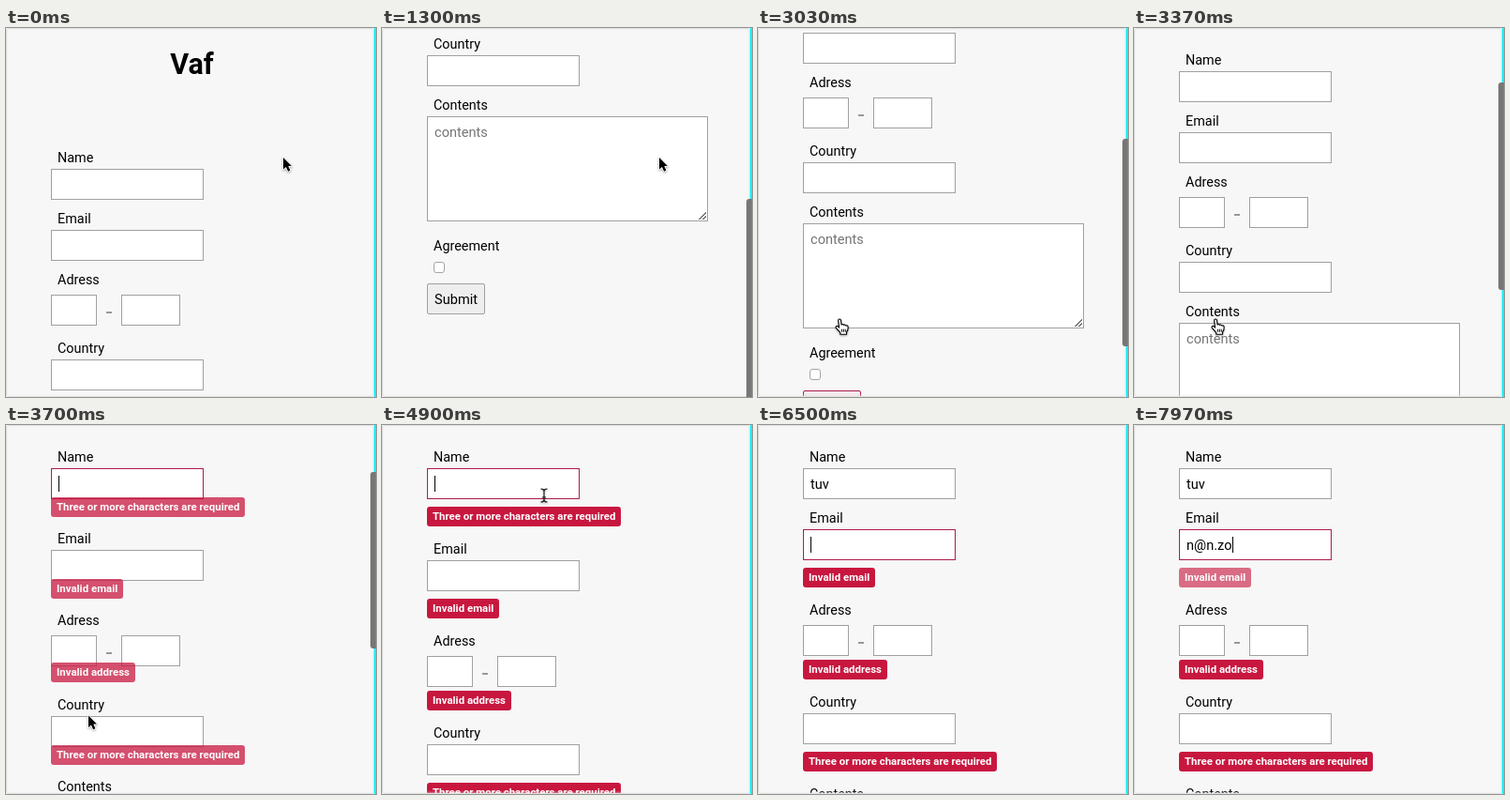
These frames come from a looping animation (395x393 px, 8 s). An HTML page:

```html
<!DOCTYPE html>
<html lang="en">
<head>
<meta charset="utf-8">
<title>Form validation</title>
<style>
html, body { margin: 0; width: 395px; height: 393px; overflow: hidden; }
#stage { position: relative; width: 395px; height: 393px; overflow: hidden; background: #f7f7f7;
  font: 14.4px/18px Roboto, "Liberation Sans", sans-serif; color: #000; cursor: none; }
#stage div, #stage svg { position: absolute; box-sizing: border-box; }
#page { left: 0; top: 0; width: 395px; }
h1 { position: absolute; left: 0; top: 21px; width: 397px; margin: 0; text-align: center; font-size: 30.5px; line-height: 36px; }
.row { left: 48px; top: 0; width: 300px; }
.label { left: 7px; white-space: nowrap; }
.box { height: 33px; border: 1px solid #a0a0a0; background: #fff; font-size: 14.6px; line-height: 32px;
  padding-left: 7px; white-space: pre; }
.caret { display: inline-block; width: 1px; height: 17px; margin-right: -1px; vertical-align: -3px; background: #000; }
.tag { left: 0; height: 21px; padding: 0 6px; border-radius: 3px; background: #c8173f; color: #fff;
  font-size: 11.45px; font-weight: 700; line-height: 20.5px; white-space: nowrap; }
#area { width: 300px; height: 112px; color: #757575; }
#submit { width: 62px; border-radius: 2px; background: #eee; }
#check { left: 7px; width: 12px; height: 12px; border: 1px solid #a5a5a5; border-radius: 3px; background: #fff; }
#frame { inset: 0 2px 0 0; border: 1px solid #e0e0e0; border-radius: 3px; box-shadow: inset 0 0 3px #ececec; }
#edge { right: 0; top: 0; width: 2px; height: 393px; background: #0ff4fb; }
#thumb { left: 389px; width: 6px; border-radius: 3px 0 0 3px; background: linear-gradient(90deg, #777 4.5px, #0bb098 4.5px); }
#cursor { left: 0; top: 0; overflow: visible; filter: drop-shadow(0 1px 1px #0005); }
</style>
</head>
<body>
<div id="stage">
  <div id="page"><h1>Vaf</h1></div>
  <div id="frame"></div>
  <div id="edge"></div>
  <div id="thumb"></div>
  <svg id="cursor" width="20" height="22">
    <g id="arrow" transform="scale(.9)" stroke-linejoin="round">
      <path d="M0 0V14L3.3 11L5.7 16.4L8.2 15.3L5.9 10.1H10Z" stroke="#fff" stroke-width="1.8" paint-order="stroke"/>
    </g>
    <g id="hand" transform="scale(.93)">
      <path d="M3.5 2C3.5 0 6.3 0 6.5 2L7 7Q8.3 5.8 9.4 7.3Q11 6.2 12 8Q14.5 7.4 14.7 9.8Q15 13 13 15.5V18H5.7V16Q3 13 .8 10.6C0 9 1.6 7.8 3 9L4.4 10.3Z"
        fill="#fff" stroke="#000" stroke-width="1.2" stroke-linejoin="round"/>
      <path d="M7.6 12V15.4M9.6 12V15.4M11.6 12V15.4" stroke="#000" fill="none"/>
    </g>
    <g id="beam" fill="none" stroke="#111" stroke-width="1.1">
      <path d="M-3.5 -7Q-.5 -7 0 -5Q.5 -7 3.5 -7M0 -5V5M-3.5 7Q-.5 7 0 5Q.5 7 3.5 7M-2 2H2"/>
    </g>
  </svg>
</div>
<script>
const LOOP = 8000;
const $ = id => document.getElementById(id);
const page = $('page');

const add = (parent, cls, css, text = '') => {
  const el = document.createElement('div');
  el.className = cls;
  el.style.cssText = css;
  el.textContent = text;
  parent.append(el);
  return el;
};

// Rows: y of the first box, label offset, boxes as [x, width], message, room it takes, gap below it
const SHORT = 'Three or more characters are required';
const rows = [
  ['Name', 150, -11, [[0, 163]], SHORT, 33, 4],
  ['Email', 215, -11, [[0, 163]], 'Invalid email', 33, 4],
  ['Adress', 284, -15, [[0, 49], [75, 63]], 'Invalid address', 25, 0],
  ['Country', 353, -11, [[0, 163]], SHORT, 33, 4],
  ['Contents', 418, -11, [], '', 0, 0],
  ['Agreement', 579, -22, [], '', 0, 0]
].map(([name, y, dy, boxes, msg, room, gap]) => {
  const el = add(page, 'row', '');
  add(el, 'label', `top:${dy - 9}px`, name);
  const fields = boxes.map(([x, w]) => add(el, 'box', `left:${x}px;width:${w}px`));
  const tag = msg && add(el, 'tag', '', msg);
  return { el, y, fields, tag, room, gap };
});
const [nameRow, emailRow, addressRow, , contentsRow, agreeRow] = rows;

add(addressRow.el, '', 'left:59px;top:18px;width:6px;height:1.5px;background:#999');
const area = add(contentsRow.el, 'box', '', 'contents');
area.id = 'area';
add(area, '', 'right:1px;bottom:1px;width:8px;height:8px;' +
  'background:linear-gradient(135deg,transparent 49%,#777 49% 57%,transparent 57% 74%,#777 74% 82%,transparent 82%)');
add(agreeRow.el, '', 'top:-6px').id = 'check';
const submit = add(agreeRow.el, 'box', 'top:17px', 'Submit');
submit.id = 'submit';

const typed = [nameRow, emailRow].map(({ fields: [box] }) => {
  const text = document.createElement('span');
  const caret = document.createElement('span');
  caret.className = 'caret';
  box.append(text, caret);
  return { box, text, caret };
});

const ramp = (t, a, b) => Math.min(1, Math.max(0, (t - a) / (b - a)));
const swing = p => .5 - Math.cos(p * Math.PI) / 2;
const easeOut = p => 1 - (1 - p) ** 3;
const during = (t, a, b) => ramp(t, a, a + 200) * (1 - ramp(t, b, b + 200));

const mix = (a, b, p) => `rgb(${a.map((v, i) => Math.round(v + (b[i] - v) * p))})`;
const GREY = [160, 160, 160], RED = [172, 28, 76];

const fields = [
  { word: 'tuv', keys: [4970, 5130, 5300], spans: [[500, 2650], [3430, 5500]] },
  { word: 'n@n.zo', keys: [6830, 7300, 7440, 7600, 7770, 7880], spans: [[5500, 9000]] }
];
const blinkStarts = [500, 3430, 5500, ...fields.flatMap(f => f.keys)];

// Pointer path: time, x, y
const path = [
  [1720, 296, 138], [1900, 170, 260], [2030, 62, 322], [2170, 72, 282], [2230, 82.5, 309.5],
  [3520, 82.5, 309.5], [3600, 88, 309.5], [3760, 88, 309.5], [4100, 130, 225], [4370, 165, 138], [4630, 173, 75]
];
const pointAt = t => {
  const i = path.findIndex(k => k[0] > t);
  if (i === 0) return path[0].slice(1);
  if (i < 0) return path[path.length - 1].slice(1);
  const [a, x, y] = path[i - 1], [b, u, v] = path[i], p = ramp(t, a, b);
  return [x + (u - x) * p, y + (v - y) * p];
};

function drawFields(t) {
  const start = Math.max(-1, ...blinkStarts.filter(s => s <= t));
  const blinkOn = (t - start) % 1000 < 500;
  fields.forEach(({ word, keys, spans }, i) => {
    const { box, text, caret } = typed[i];
    const focused = spans.some(([a, b]) => t >= a && t < b);
    const glow = Math.max(...spans.map(([a, b]) => during(t, a, b)));
    text.textContent = word.slice(0, keys.filter(k => k <= t).length);
    caret.style.opacity = +(focused && blinkOn);
    box.style.borderColor = mix(GREY, RED, glow);
  });
  const pressed = during(t, 2650, 3430);
  submit.style.borderColor = mix(GREY, RED, pressed);
  submit.style.background = mix([238, 238, 238], [243, 232, 236], pressed);
}

function drawCursor(t) {
  const [x, y] = pointAt(t);
  const inBox = t > 4000 && ((y > 46 && y < 79) || (y > 144 && y < 177));
  const kind = inBox ? 'beam' : t >= 2170 && t < 3520 ? 'hand' : 'arrow';
  for (const id of ['arrow', 'hand', 'beam']) $(id).style.display = id === kind ? '' : 'none';
  $('cursor').style.transform = `translate(${x}px,${y}px)`;
  $('cursor').style.display = t < 4970 ? '' : 'none';
}

function draw(t) {
  const scroll = 324 * easeOut(ramp(t, 870, 1290)) - 220 * swing(ramp(t, 2673, 3373));
  const show = easeOut(ramp(t, 3580, 3970));
  const close = easeOut(ramp(t, 5695, 6000));
  const fades = [ramp(t, 5420, 5660), ramp(t, 7880, 8120)];

  let shift = 0;
  rows.forEach((r, i) => {
    r.el.style.transform = `translateY(${Math.round(r.y + shift - scroll)}px)`;
    if (!r.tag) return;
    const room = r.room * show * (i ? 1 : 1 - close);
    r.tag.style.top = Math.round(12 + room - r.gap * show) + 'px';
    r.tag.style.opacity = show ** .75 * (1 - (fades[i] || 0));
    shift += room;
  });
  page.firstElementChild.style.transform = `translateY(${-Math.round(scroll)}px)`;

  const height = 699 + 183 * show;
  const thumb = $('thumb').style;
  thumb.top = scroll * 393 / height + 'px';
  thumb.height = 393 * 393 / height + 'px';
  thumb.opacity = ramp(t, 860, 920) - ramp(t, 1720, 1980) + ramp(t, 2660, 2720) - ramp(t, 4120, 4360);

  drawFields(t);
  drawCursor(t);
}

const begin = performance.now();
function tick() {
  draw((performance.now() - begin) % LOOP);
  requestAnimationFrame(tick);
}
tick();
</script>
</body>
</html>
```
